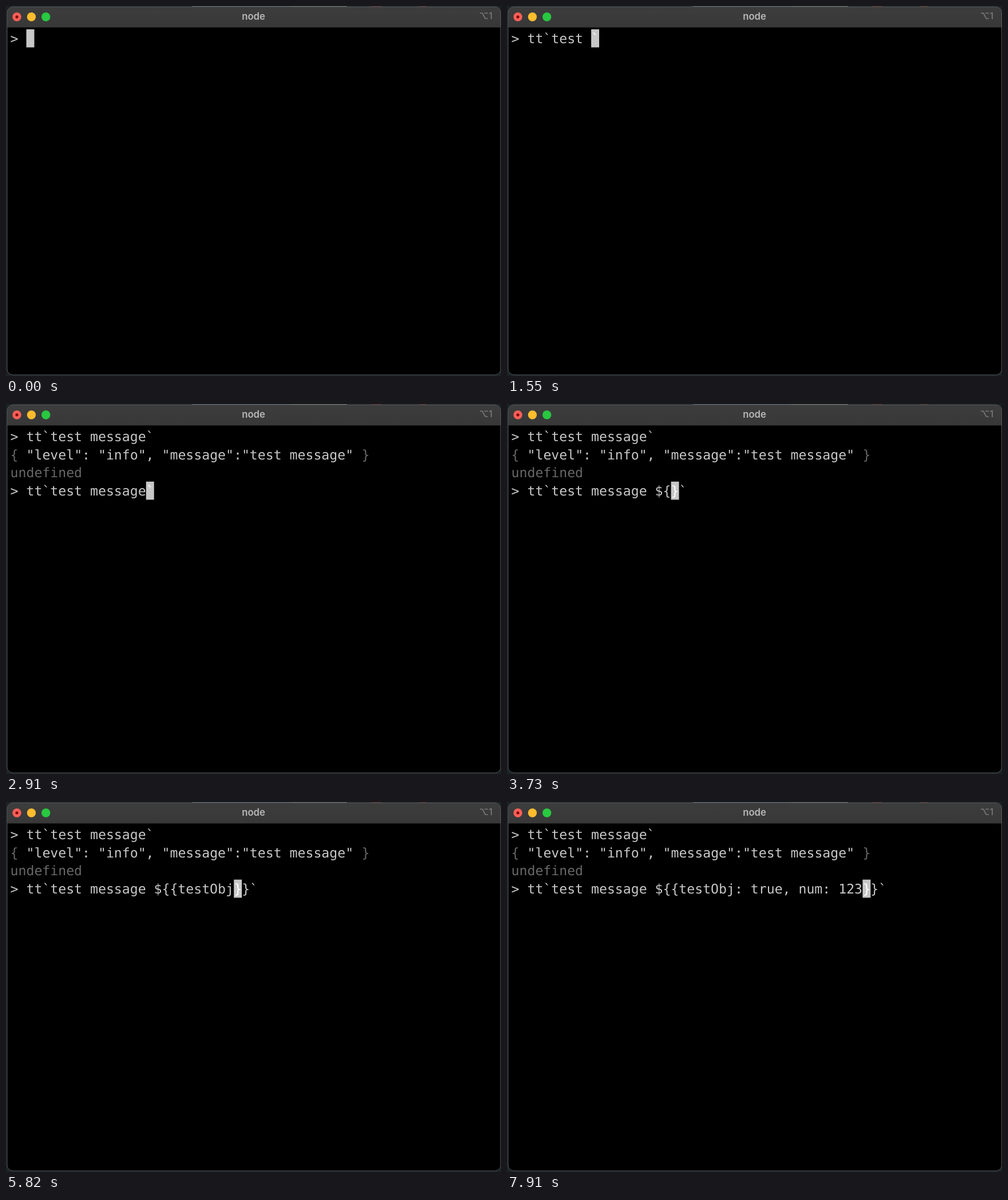
Recreate the animation shown at these times as an HTML page. Size 865 px wide and 647 px high, loop 8 s.

```html
<!DOCTYPE html>
<html lang="en">
<head>
<meta charset="utf-8">
<title>node</title>
<style>
  html, body { margin: 0; width: 100%; height: 100%; overflow: hidden; background: #1b2327; }
  svg { display: block; width: 100vw; height: 100vh; }
  #screen { font: 23.17px "DejaVu Sans Mono", monospace; fill: #c7c7c7; }
  #screen text { white-space: pre; text-rendering: geometricPrecision; }
  #screen .dim { fill: #686868; }
  #screen .under { fill: #fff; }
  .title { font: 600 16.7px Inter, sans-serif; fill: #b9b9b9; text-anchor: middle; }
  .shortcut { font: 500 16px Inter, sans-serif; fill: #797979; }
</style>
</head>
<body>
<svg viewBox="0 0 865 647">
  <defs>
    <linearGradient id="bar" x2="0" y2="1">
      <stop stop-color="#3d3d3d"/>
      <stop offset="1" stop-color="#383838"/>
    </linearGradient>
    <clipPath id="window"><rect x="2" y="1.5" width="862.5" height="643.5" rx="10"/></clipPath>
  </defs>

  <!-- desktop showing around the window -->
  <rect width="865" height="647" fill="#1b2327"/>
  <path d="M325 .5H496" stroke="#53636b"/>
  <path d="M496 .5H596" stroke="#68736d"/>
  <path d="M638 .5H656M722 .5H735" stroke="#5a3028"/>

  <g clip-path="url(#window)">
    <rect width="865" height="647"/>
    <rect width="865" height="37" fill="url(#bar)"/>
    <path d="M0 37.5H865" stroke="#1c1c1c"/>
  </g>
  <rect x="2" y="1.5" width="862.5" height="643.5" rx="10" fill="none" stroke="#545759"/>

  <circle cx="19" cy="19" r="7.7" fill="#ff5f57"/>
  <circle cx="19" cy="19" r="2.6" fill="#7e0508"/>
  <circle cx="44.4" cy="19" r="7.7" fill="#febc2e"/>
  <circle cx="69.7" cy="19" r="7.7" fill="#28c840"/>
  <text class="title" x="432.5" y="24">node</text>
  <path d="M828 12.5h4.5l5 9.5h4.500M836 12.500h6" fill="none" stroke="#797979" stroke-width="1.7"/>
  <text class="shortcut" x="843.5" y="23">1</text>

  <g id="screen"></g>
</svg>
<script>
const LOOP = 8000, CELL_W = 13.95, CELL_H = 31.67, LEFT = 7.6, TOP = 40.7, BASELINE = 24.2;
const screen = document.getElementById('screen');

// Time in ms and keys pressed: ← left, ⌫ delete, ↵ enter, ↑ history
const keys = [
  [730, 't'], [820, 't'], [910, '`'], [1000, '`'], [1090, '←'],
  [1270, 'te'], [1360, 'st'],
  [1550, ' '], [1640, 'm'], [1730, 'es'], [1820, 's'], [1910, 'ag'], [2000, 'e'],
  [2270, '↵'], [2730, '↑'], [2910, '←'],
  [3090, ' '], [3270, '$'], [3450, '{'], [3550, '}'], [3730, '←'],
  [3820, '{'], [3910, '}'], [4000, '←'],
  [4450, 'te'], [4550, 'st'], [5000, 'O'], [5360, 'j'], [5550, '⌫'], [5820, 'bj'],
  [6000, ':'], [6090, ' '], [6450, 'tr'], [6550, 'ue'], [6820, ', '],
  [7180, 'n'], [7360, 'u'], [7450, 'm'], [7640, ':'], [7730, ' '], [7910, '123']
];

function stateAt(time) {
  const state = { line: '', pos: 0, sent: null };
  const pressed = keys.filter(([at]) => at <= time).map(([, text]) => text).join('');
  for (const key of pressed) {
    const { line, pos, sent } = state;
    if (key === '←') state.pos--;
    else if (key === '⌫') {
      state.line = line.slice(0, pos - 1) + line.slice(pos);
      state.pos--;
    } else if (key === '↵') Object.assign(state, { sent: line, line: '', pos: 0 });
    else if (key === '↑') Object.assign(state, { line: sent, pos: sent.length });
    else {
      state.line = line.slice(0, pos) + key + line.slice(pos);
      state.pos++;
    }
  }
  return state;
}

const x = col => LEFT + col * CELL_W;
const y = row => TOP + row * CELL_H;

function put(col, row, text, style = '') {
  return `<text class="${style}" x="${x(col)}" y="${y(row) + BASELINE}">${text.replace(/>/g, '&gt;')}</text>`;
}

function render(time) {
  const { line, pos, sent } = stateAt(time);
  const row = sent ? 3 : 0, col = pos + 2;
  let out = '';
  if (sent) {
    const json = `"level": "info", "message":"${sent.slice(3, -1)}"`;
    out += put(0, 0, '> ' + sent)
      + put(0, 1, '{', 'dim') + put(2, 1, json) + put(json.length + 3, 1, '}', 'dim')
      + put(0, 2, 'undefined', 'dim');
  }
  out += put(0, row, '> ' + line.slice(0, pos))
    + `<rect x="${x(col)}" y="${y(row)}" width="${CELL_W}" height="${CELL_H}"/>`
    + put(col, row, line.slice(pos, pos + 1), 'under')
    + put(col + 1, row, line.slice(pos + 1));
  return out;
}

let shown;
function tick() {
  const picture = render(performance.now() % LOOP);
  if (picture !== shown) screen.innerHTML = shown = picture;
  requestAnimationFrame(tick);
}
tick();
</script>
</body>
</html>
```
